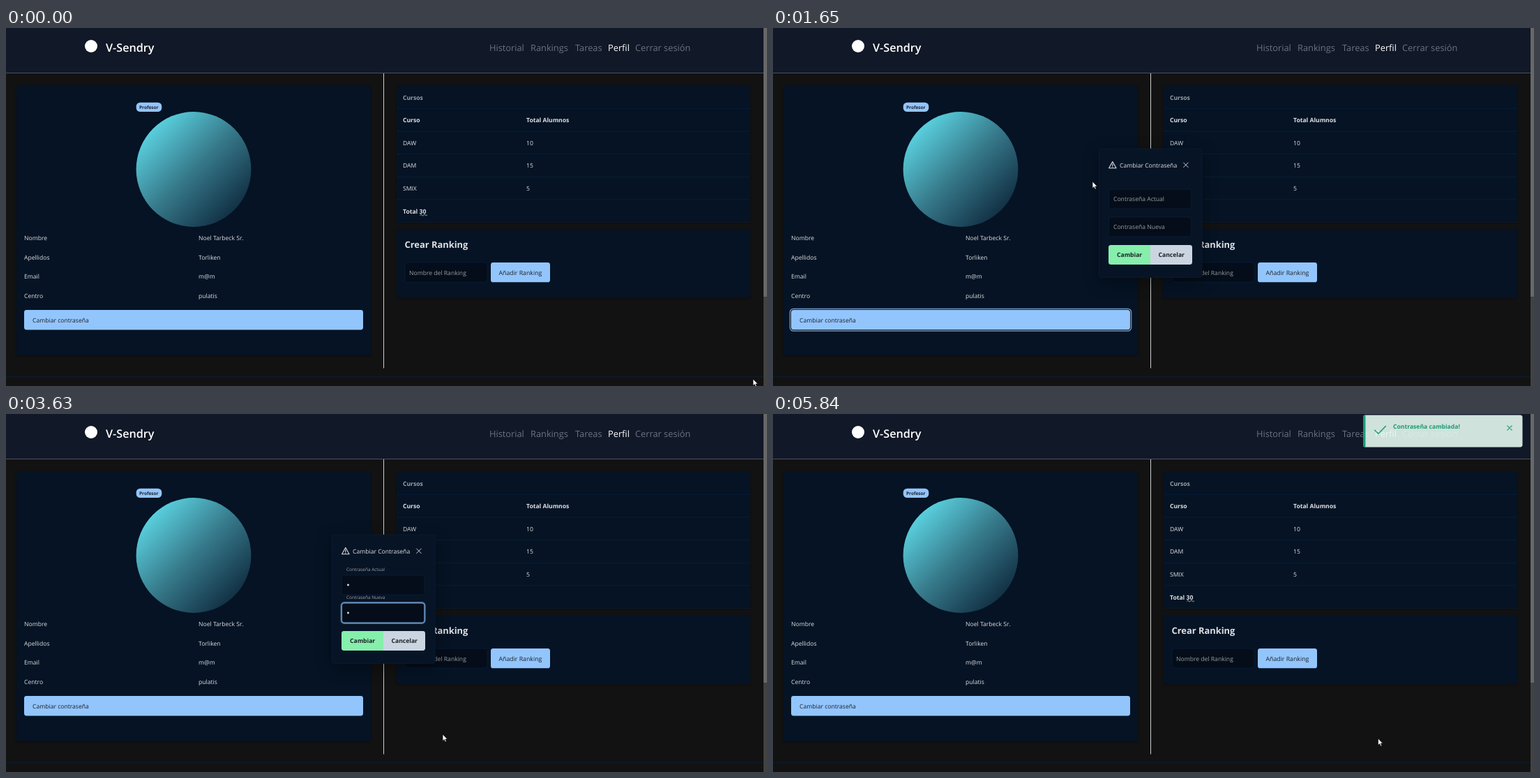
An HTML page for the animation above (7000 ms loop, 1091 px wide and 513 px high).

```html
<!DOCTYPE html>
<html lang="es">
<head>
<meta charset="utf-8">
<title>Perfil</title>
<style>
  html, body { margin: 0; width: 100%; height: 100%; overflow: hidden; background: #121212; }
  svg { display: block; }
  text {
    font: 400 8.6px "Open Sans", "Noto Sans", sans-serif;
    fill: rgba(255, 255, 255, .87);
    text-rendering: geometricPrecision;
    white-space: pre;
  }
  .b { font-weight: 700; }
  .soft { fill: rgba(255, 255, 255, .6); }
  .ink { fill: #1c2127; }
  .nav { font-size: 12.8px; fill: #6b7280; }
  .on { fill: #fff; }
  .card { fill: #051324; filter: drop-shadow(0 1px 1.5px rgba(0, 0, 0, .35)); }
  .rule { stroke: #0b213f; stroke-width: .7; }
  .field { fill: #040d19; stroke: #0b213f; stroke-width: .7; }
  .blue { fill: #93c5fd; }
  .line { fill: none; stroke: #dfe1e5; stroke-linecap: round; stroke-linejoin: round; }
  .gap { fill: none; stroke: #1c2127; stroke-width: 1.2; }
  .ring { fill: none; stroke: #93c5fd; stroke-width: 1.2; stroke-opacity: .8; }
  .mint { stroke: #86efac; }
  .glow { fill: none; stroke: #93c5fd; stroke-width: 1.8; stroke-opacity: .5; }
  .edge { fill: none; stroke: #93c5fd; stroke-width: .8; }
  .ok { fill: none; stroke: #1ea97c; stroke-linecap: round; stroke-linejoin: round; }
  #dialog { filter: drop-shadow(0 6px 11px rgba(0, 0, 0, .35)); }
</style>
</head>
<body>
<svg width="1091" height="513" viewBox="0 0 1091 513">
  <defs>
    <linearGradient id="sea" x1=".12" y1=".12" x2=".88" y2=".88">
      <stop offset="0" stop-color="#5cd5e3"/>
      <stop offset=".5" stop-color="#36798a"/>
      <stop offset="1" stop-color="#102c40"/>
    </linearGradient>
    <clipPath id="wideClip"><rect x="26" y="404" width="486" height="28.5" rx="3.4"/></clipPath>
    <clipPath id="sendClip"><path d="M541 311H484.400Q481 311 481 314.400V335.600Q481 339 484.400 339H541Z"/></clipPath>
  </defs>

  <rect width="1091" height="513" fill="#121212"/>
  <rect width="1086" height="64" fill="#111827"/>
  <rect y="64" width="1086" height="1" fill="#4b5160"/>
  <rect x="541" y="65" width="1" height="422.500" fill="#cfcfcf"/>
  <path class="rule" d="M0 499.500H1086"/>
  <rect x="1086" width="5" height="513" fill="#424242"/>
  <rect x="1086" width="5" height="385" fill="#686868"/>

  <circle cx="122" cy="26" r="9" fill="#fff"/>
  <text x="143" y="33.500" style="font-size:16.2px;font-weight:600;fill:#fff">V-Sendry</text>
  <g id="nav"></g>

  <rect class="card" x="15" y="83" width="508" height="386" rx="3"/>
  <circle cx="269" cy="202.500" r="82.400" fill="url(#sea)"/>
  <rect class="blue" x="186.700" y="106.700" width="36.600" height="13.400" rx="5.700"/>
  <text class="b ink" x="191" y="116" style="font-size:6.5px">Profesor</text>
  <g id="person"></g>
  <rect class="blue" x="26" y="404" width="486" height="28.500" rx="3.400"/>
  <g clip-path="url(#wideClip)">
    <rect id="wideHover" x="26" y="404" width="486" height="28.500" fill="#77b6fd"/>
    <circle id="wideRipple" cx="309" cy="412" fill="#fff"/>
  </g>
  <g id="wideFocus">
    <rect class="gap" x="25.400" y="403.400" width="487.200" height="29.700" rx="4"/>
    <rect class="ring" x="24.300" y="402.300" width="489.400" height="31.900" rx="5"/>
  </g>
  <text class="ink" x="38" y="421.500">Cambiar contraseña</text>

  <rect class="card" x="560" y="83" width="507" height="195" rx="3"/>
  <g id="courses"></g>
  <path class="line" stroke-width=".8" d="M593.500 268q1.300-2.200 2.600 0t2.600 0t2.600 0t2.200 0"/>

  <rect class="card" x="560" y="288" width="507" height="99" rx="3"/>
  <text class="b" x="571.500" y="315" style="font-size:12.9px">Crear Ranking</text>
  <rect class="field" x="572" y="336" width="118" height="28" rx="3.400"/>
  <text class="soft" x="578" y="353.500">Nombre del Ranking</text>
  <rect class="blue" x="695" y="336" width="85" height="28.300" rx="3.400"/>
  <text class="ink" x="706.500" y="353.500" style="font-size:8.75px">Añadir Ranking</text>

  <g id="dialog">
    <rect x="467.500" y="173" width="147.500" height="184.700" rx="3.400" fill="#071426" stroke="#0b213f" stroke-width=".6"/>
    <path class="line" stroke-width="1.100" d="M486.800 191.600L492 200.800H481.600ZM486.800 194.800v2.800M486.800 199.100v.1"/>
    <text x="497" y="199.500">Cambiar Contraseña</text>
    <path class="line" stroke-width=".9" d="M588.600 193l6.600 6.600m0-6.600l-6.600 6.600"/>
    <g id="fields"></g>
    <path d="M541 311H484.400Q481 311 481 314.400V335.600Q481 339 484.400 339H541Z" fill="#86efac"/>
    <path d="M541 311H597.600Q601 311 601 314.400V335.600Q601 339 597.600 339H541Z" fill="#cbd5e1"/>
    <g clip-path="url(#sendClip)">
      <rect id="sendHover" x="481" y="311" width="60" height="28" fill="#56e889"/>
      <circle id="sendRipple" cx="499" cy="325" fill="#fff"/>
    </g>
    <g id="sendFocus">
      <rect class="gap" x="480.400" y="310.400" width="61.200" height="29.200" rx="4"/>
      <rect class="ring mint" x="479.400" y="309.400" width="63.200" height="31.200" rx="5"/>
    </g>
    <text class="b ink" x="493" y="328">Cambiar</text>
    <text class="b ink" x="552.500" y="328">Cancelar</text>
  </g>

  <g id="toast">
    <rect x="846" y="1.500" width="228.500" height="46" rx="3.400" fill="#e4f8f0"/>
    <path d="M849.400 1.500H849Q846 1.500 846 4.500V44.500Q846 47.500 849 47.500H849.400Z" fill="#1ea97c"/>
    <path class="ok" stroke-width="1.600" d="M862.800 23.300l5 5L878.300 17.500"/>
    <text class="b" x="889" y="21" style="fill:#1ea97c">Contraseña cambiada!</text>
    <path class="ok" stroke-width="1.200" d="M1052.800 16.800l6.400 6.400m0-6.400l-6.400 6.400"/>
  </g>

  <g id="pointer">
    <circle id="press" r="7" fill="#e6d800" fill-opacity=".7"/>
    <path id="arrow" d="M0 0V9.600L2.200 7.600L3.700 11L5.300 10.300L3.800 7H6.800Z" fill="#fff" stroke="#111" stroke-width=".7"/>
    <path id="hand" fill="#fff" stroke="#111" stroke-width=".8" stroke-linejoin="round"
      d="M-1 1Q0-.6 1 1V5Q2.300 4.300 2.900 5.500Q4.200 5 4.600 6.200Q6 5.900 6 7.500V10Q5.800 12 4.700 14H-.4Q-1.600 11.600-3.500 9.200Q-4.400 7.400-2.600 7.500L-1 9Z"/>
    <path id="beam" fill="none" stroke="#e9e9e9" stroke-width=".9" d="M-.6-5h1.200q1 0 1 1V6q0 1 1 1h1.200M3.800-5h-1.200q-1 0-1 1M1.600 6q0 1-1 1h-1.200"/>
  </g>
</svg>
<script>
const $ = id => document.getElementById(id);
const label = (x, y, s, cls = "") => `<text class="${cls}" x="${x}" y="${y}">${s}</text>`;

$("nav").innerHTML = [[693, "Historial"], [752, "Rankings"], [816, "Tareas"], [863, "Perfil"], [902, "Cerrar sesión"]]
  .map(([x, s]) => label(x, 33, s, s === "Perfil" ? "nav on" : "nav")).join("");

$("person").innerHTML = [["Nombre", "Noel Tarbeck Sr."], ["Apellidos", "Torliken"], ["Email", "m@m"], ["Centro", "pulatis"]]
  .map(([a, b], i) => label(26, 304 + i * 27.5, a) + label(276, 304 + i * 27.5, b)).join("");

$("courses").innerHTML = [["Cursos", "", "b soft"], ["Curso", "Total Alumnos", "b"], ["DAW", "10"], ["DAM", "15"], ["SMIX", "5"], ["Total 30", "", "b"]]
  .map(([a, b, cls], i) => {
    const y = 102.5 + i * 32.6;
    return label(569, y, a, cls) + label(746, y, b, cls) + `<path class="rule" d="M560 ${y + 12.8}H1067"/>`;
  }).join("");

$("fields").innerHTML = ["Contraseña Actual", "Contraseña Nueva"].map((s, i) => {
  const y = 231 + i * 40;
  const box = (cls, id, grow) =>
    `<rect class="${cls}" id="${id}${i}" x="${481.4 - grow}" y="${y - grow}" width="${118.4 + 2 * grow}" height="${28 + 2 * grow}" rx="${3.4 + grow}"/>`;
  return box("field", "field", 0) + box("glow", "glow", 1) + box("edge", "edge", 0) +
    `<text class="soft" id="hint${i}">${s}</text><circle id="dot${i}" cx="490.5" cy="${y + 14}" r="1.4" fill="#e4e6ea"/>`;
}).join("");

const LOOP = 7000;
const clamp = v => Math.min(1, Math.max(0, v));
const smooth = v => v * v * (3 - 2 * v);

function bezier(x1, y1, x2, y2) {
  const at = (a, b, u) => 3 * a * u * (1 - u) ** 2 + 3 * b * u * u * (1 - u) + u ** 3;
  return x => {
    let lo = 0, hi = 1;
    for (let i = 0; i < 24; i++) {
      const mid = (lo + hi) / 2;
      if (at(x1, x2, mid) < x) lo = mid; else hi = mid;
    }
    return at(y1, y2, hi);
  };
}
const ease = bezier(.25, .1, .25, 1);
const easeIn = bezier(0, 0, .2, 1);
const easeOut = bezier(.4, 0, .2, 1);

const ramp = (t, start, span, curve = ease) => t <= start ? 0 : curve(clamp((t - start) / span));
const pulse = (t, on, off, span = 200) => ramp(t, on, span) * (1 - ramp(t, off, span));
const between = (t, a, b) => t >= a && t < b;

// time, x, y of the pointer's hot spot
const track = [
  [0, 1071, 503], [660, 389, 279], [760, 389, 279], [1080, 309.5, 406], [1405, 309.5, 406],
  [1650, 458, 220], [2110, 487, 242], [2600, 487, 242], [2800, 486, 278], [2895, 486, 278],
  [3070, 649, 483], [3480, 649, 483], [4090, 499.5, 326], [4920, 499.5, 326],
  [5180, 867.5, 465], [LOOP, 867.5, 465]
];
const presses = [[1110, 1177], [2440, 2520], [2830, 2895], [4375, 4410]];

function pointerAt(t) {
  const i = track.findIndex((p, k) => k && t <= p[0]);
  const [t0, x0, y0] = track[i - 1], [t1, x1, y1] = track[i];
  const k = smooth((t - t0) / (t1 - t0));
  return [x0 + (x1 - x0) * k, y0 + (y1 - y0) * k];
}

function pointerKind(t, x, y) {
  const inside = (l, top, r, b) => x >= l && x <= r && y >= top && y <= b;
  if (inside(26, 404, 512, 432)) return "hand";
  if (between(t, 1400, 5515)) {
    if (inside(481, 311, 601, 339)) return "hand";
    if (inside(481, 231, 600, 259) || inside(481, 271, 600, 299)) return "beam";
  }
  return "arrow";
}

const fade = (id, v) => $(id).setAttribute("opacity", v.toFixed(3));

function ripple(id, t, start, size) {
  const k = clamp((t - start) / 400);
  $(id).setAttribute("r", size * 1.25 * k);
  fade(id, .48 * (1 - k));
}

function field(i, t, focus, blur, hoverOn, hoverOff, typed) {
  const held = pulse(t, focus, blur);
  const up = ramp(t, focus, 200);
  fade("glow" + i, held);
  fade("edge" + i, Math.max(held, pulse(t, hoverOn, hoverOff)));
  $("hint" + i).setAttribute("transform", `translate(488 ${248 + i * 40 - 22.7 * up}) scale(${1 - .25 * up})`);
  fade("dot" + i, t >= typed ? 1 : 0);
}

function render(t) {
  fade("wideHover", pulse(t, 1050, 1425));
  fade("wideFocus", pulse(t, 1110, 2450));
  ripple("wideRipple", t, 1177, 486);

  const open = ramp(t, 1248, 150, easeIn) * (1 - ramp(t, 5512, 150, easeOut));
  fade("dialog", open);
  $("dialog").setAttribute("transform", `translate(541 265.5) scale(${.7 + .3 * open}) translate(-541 -265.5)`);
  field(0, t, 2450, 2880, 1900, 2680, 2620);
  field(1, t, 2880, 4395, 2700, 2930, 3390);
  fade("sendHover", ramp(t, 3960, 200));
  fade("sendFocus", ramp(t, 4395, 200));
  ripple("sendRipple", t, 4410, 60);

  const shown = ramp(t, 5525, 300);
  fade("toast", .9 * shown);
  $("toast").setAttribute("transform", `translate(0 ${46 * (1 - shown)})`);

  const [x, y] = pointerAt(t);
  const kind = pointerKind(t, x, y);
  $("pointer").setAttribute("transform", `translate(${x} ${y})`);
  for (const id of ["arrow", "hand", "beam"]) fade(id, id === kind ? 1 : 0);
  fade("press", presses.some(([a, b]) => between(t, a, b)) ? 1 : 0);
}

const began = performance.now();
function tick() {
  render((performance.now() - began) % LOOP);
  requestAnimationFrame(tick);
}
tick();
</script>
</body>
</html>
```
